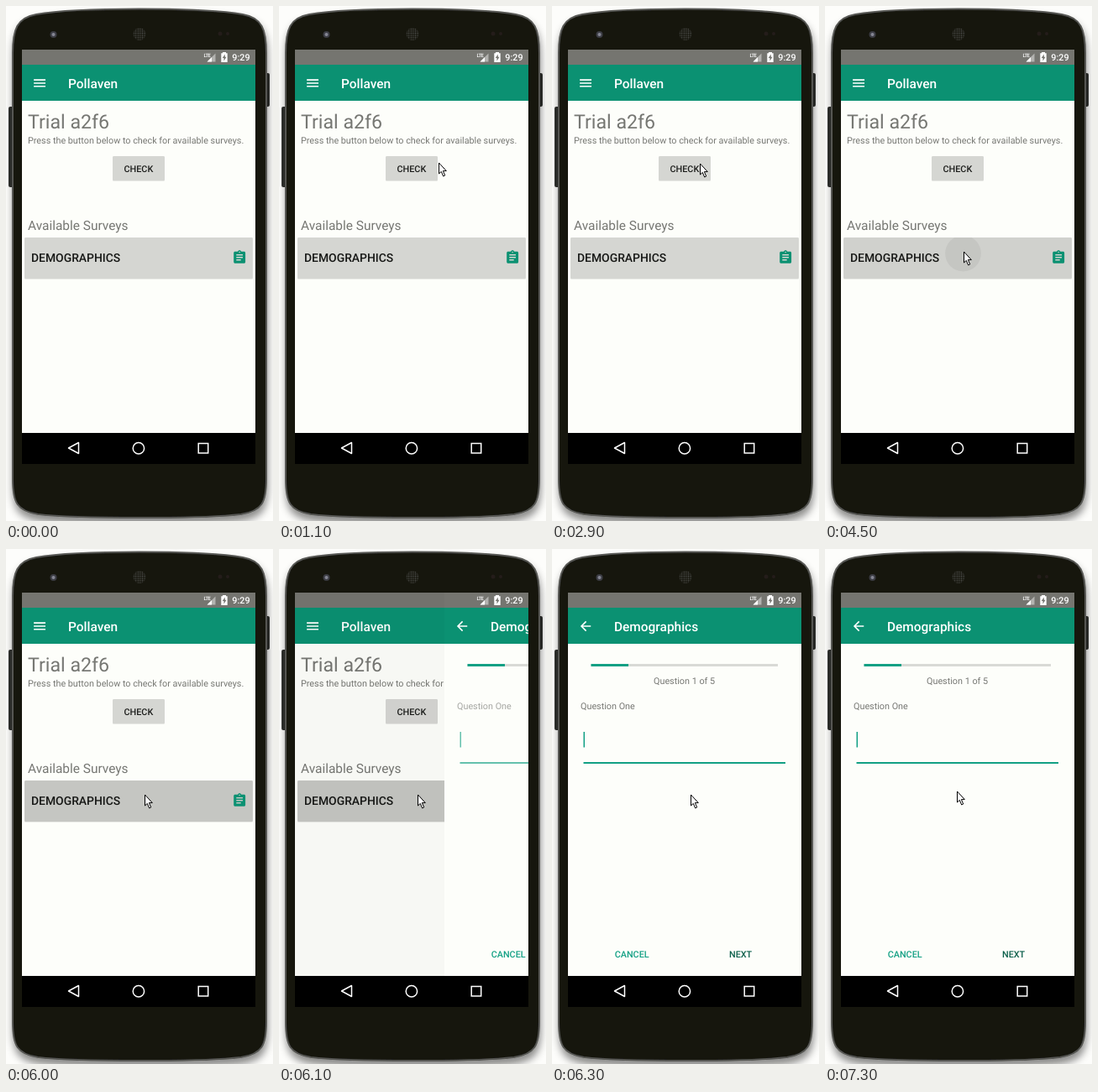
Animation of 318x614 px, one loop 8000 ms. Source, as an HTML page:

```html
<!DOCTYPE html>
<html lang="en">
<head>
<meta charset="utf-8">
<title>Survey app demo</title>
<style>
  html, body { margin: 0; width: 100%; height: 100%; overflow: hidden; background: #fdfdfb; }
  svg { display: block; width: 100%; height: 100%; }
  text { font: 400 10.81px Roboto, sans-serif; fill: #767773; text-rendering: geometricPrecision; }
  .medium { font-weight: 500; }
  .title { font-size: 15.44px; font-weight: 500; fill: #fff; }
  .headline { font-size: 23.16px; }
  .section { font-size: 15.44px; }
  .row { font-size: 13.9px; font-weight: 500; fill: #161715; }
  .dark { fill: #1c1d1b; }
  .teal { fill: #12a084; }
  .green { fill: #0b9172; }
  .paper { fill: #fdfefa; }
  .button { fill: #d5d6d2; }
  .status { fill: #757570; }
  .line { fill: none; stroke: #fff; stroke-width: 1.5; }
</style>
</head>
<body>
<svg viewBox="0 0 318 614">
  <defs>
    <filter id="soft" x="-10%" y="-10%" width="120%" height="120%">
      <feDropShadow dx="1" dy="7" stdDeviation="5" flood-color="#000" flood-opacity=".45"/>
    </filter>
    <filter id="lift" x="-10%" y="-20%" width="120%" height="150%">
      <feDropShadow dx="0" dy=".3" stdDeviation=".7" flood-color="#000" flood-opacity=".28"/>
    </filter>
    <pattern id="mesh" width="2.6" height="2.6" patternUnits="userSpaceOnUse">
      <circle cx="1.3" cy="1.3" r=".8" fill="#4c4d4a"/>
    </pattern>
    <clipPath id="screen"><path d="M19 52H297V509H19Z"/></clipPath>
    <clipPath id="checkClip"><rect x="127" y="179" width="62" height="29" rx="1.5"/></clipPath>
    <clipPath id="rowClip"><rect x="22" y="276" width="272" height="49" rx="1.5"/></clipPath>
  </defs>

  <!-- phone -->
  <g fill="#30312e">
    <rect x="3" y="120" width="7" height="96" rx="2"/>
    <rect x="308" y="80" width="6" height="40" rx="2"/>
  </g>
  <path filter="url(#soft)" fill="#161611" stroke="#565753" stroke-width="2"
    d="M8 56C8 28 13 14 36 10Q72 3.500 159 3.500T282 10C305 14 310 28 310 56V564C310 592 305 602 280 606Q246 610 159 610T38 606C13 602 8 592 8 564Z"/>
  <circle cx="56.500" cy="34" r="4" fill="#3c3d44"/>
  <circle cx="56.500" cy="34" r="2" fill="#858693"/>
  <circle cx="159" cy="33.500" r="7.500" fill="url(#mesh)"/>
  <g fill="#241d1a"><circle cx="255" cy="33" r="2.500"/><circle cx="264" cy="33" r="2"/></g>

  <g clip-path="url(#screen)">
    <!-- survey list -->
    <path class="paper" d="M19 52H297V509H19Z"/>
    <path class="status" d="M19 52H297V70H19Z"/>
    <path class="green" d="M19 70H297V113H19Z"/>
    <path fill="#fff" transform="translate(30.800 82.700) scale(.772)" d="M3 18h18v-2H3zM3 13h18v-2H3zM3 6v2h18V6z"/>
    <text class="title" x="74" y="97.800">Pollaven</text>
    <text class="headline" x="26" y="146">Trial a2f6</text>
    <text x="26" y="164">Press the button below to check for available surveys.</text>
    <rect class="button" filter="url(#lift)" x="127" y="179" width="62" height="29" rx="1.500"/>
    <g id="checkPress" clip-path="url(#checkClip)">
      <path fill-opacity=".04" d="M127 179h62v29h-62z"/>
      <circle id="checkRipple" cx="176" cy="193" r="28" fill-opacity=".035"/>
    </g>
    <text class="medium dark" x="140.500" y="197.500">CHECK</text>

    <g id="list">
      <text class="section" x="26" y="267">Available Surveys</text>
      <rect class="button" filter="url(#lift)" x="22" y="276" width="272" height="49" rx="1.500"/>
      <g id="rowPress" clip-path="url(#rowClip)">
        <path fill-opacity=".02" d="M22 276h272v49H22z"/>
        <circle id="rowRipple" cx="164.500" cy="295" r="21.500" fill-opacity=".055"/>
      </g>
      <text class="row" x="30" y="305.300">DEMOGRAPHICS</text>
      <path class="green" transform="translate(268.900 290.500) scale(.772)"
        d="M19 3h-4.180C14.400 1.840 13.300 1 12 1s-2.400.840-2.820 2H5c-1.100 0-2 .9-2 2v14c0 1.100.9 2 2 2h14c1.100 0 2-.9 2-2V5c0-1.100-.9-2-2-2zm-7 0c.550 0 1 .450 1 1s-.450 1-1 1-1-.450-1-1 .450-1 1-1zm2 14H7v-2h7zm3-4H7v-2h10zm0-4H7V7h10z"/>
    </g>
    <rect id="spinner" class="green" x="158" y="253.500" width="4" height="3" rx=".5" transform="rotate(18 160 255)"/>
    <path id="dim" d="M19 52H297V509H19Z"/>

    <!-- question page -->
    <g id="page">
      <path class="paper" d="M19 52H297V509H19Z"/>
      <path class="status" d="M19 52H297V70H19Z"/>
      <path class="green" d="M19 70H297V113H19Z"/>
      <path fill="#fff" transform="translate(30.800 82.700) scale(.772)" d="M20 11H7.830l5.590-5.590L12 4l-8 8 8 8 1.410-1.410L7.830 13H20z"/>
      <text class="title" x="74" y="97.800">Demographics</text>
      <path fill="#d9dad6" d="M46.500 137H269v3H46.500z"/>
      <path class="teal" d="M46.500 137H91v3H46.500z"/>
      <text x="121" y="161">Question 1 of 5</text>
      <g id="field" class="teal">
        <text x="34" y="191">Question One</text>
        <path id="caret" d="M37.500 218h1.500v18.500h-1.500z"/>
        <path d="M37.500 254H278v2H37.500z"/>
      </g>
      <text class="medium teal" x="74.700" y="486.500">CANCEL</text>
      <text class="medium" style="fill:#0a5f4a" x="211" y="486.500">NEXT</text>
    </g>
  </g>

  <!-- status icons -->
  <g fill="#fff">
    <text x="235.500" y="60.500" style="font-size:6px;font-weight:500;fill:#fff;letter-spacing:-.7px">LTE</text>
    <path fill-opacity=".45" d="M249.500 56.500V66.500H239.500Z"/>
    <path d="M245 61V66.500H239.500Z"/>
    <path d="M258 55h4v1.300h1.700V67H256.300V56.300H258Z"/>
    <path class="status" d="M260.800 57.500l-3 4.600h1.700v3.400l3-4.700h-1.700z"/>
    <text class="medium" style="fill:#fff" x="269.300" y="65.300">9:29</text>
  </g>

  <!-- navigation bar -->
  <path d="M19 509H297V546H19Z"/>
  <g class="line">
    <path stroke-linejoin="round" d="M74.500 527L86.500 520.500V533.500Z"/>
    <circle cx="157.900" cy="527.200" r="6.700"/>
    <path d="M229.200 521.500h11.500v11.500h-11.500z"/>
  </g>

  <path id="cursor" fill="#fff" stroke="#000" stroke-linejoin="round" d="M.5 1V14L3.300 11.400L5.700 17L7.700 16L5.400 10.600H9.300Z"/>
</svg>

<script>
  const LOOP = 8000;
  const move = (x, y = 0) => `translate(${x}px, ${y}px)`;

  // Hold each value until the next time in the table.
  function hold(id, property, steps) {
    const frames = steps.map(([time, value]) =>
      ({ offset: time / LOOP, [property]: value, easing: 'steps(1, end)' }));
    frames.push({ offset: 1, [property]: steps.at(-1)[1] });
    document.getElementById(id).animate(frames, { duration: LOOP, iterations: Infinity });
  }

  const show = (id, from, to) =>
    hold(id, 'opacity', [[0, 0], [from, 1], [to, 0]]);

  hold('cursor', 'opacity', [[0, 0], [600, 1]]);
  hold('cursor', 'transform', [
    [0, 151, 193], [600, 151, 193], [700, 185, 194], [800, 224, 194], [900, 216, 184],
    [1100, 190, 186], [1200, 176, 187],
    [3600, 176, 193], [3700, 175, 212], [3800, 173, 240], [3900, 169, 268], [4000, 166, 286], [4100, 165, 292],
    [7200, 160, 290], [7300, 157, 288]
  ].map(([time, x, y]) => [time, move(x, y)]));

  show('checkPress', 1400, 2900);
  hold('checkRipple', 'r', [[0, '12px'], [1500, '28px']]);
  hold('list', 'opacity', [[0, 1], [1500, 0], [2900, 1]]);
  show('spinner', 1500, 2900);

  show('rowPress', 4500, 6300);
  hold('rowRipple', 'r', [[0, '21.5px'], [6000, '150px']]);

  hold('dim', 'opacity', [[0, 0], [6100, .025], [6200, .2], [6300, 0]]);
  hold('page', 'transform', [[0, move(279)], [6100, move(178)], [6200, move(44)], [6300, move(0)]]);
  hold('field', 'opacity', [[0, .65], [6200, 1]]);
  hold('caret', 'opacity', [[0, 1], [6800, 0], [7300, 1]]);
</script>
</body>
</html>
```
